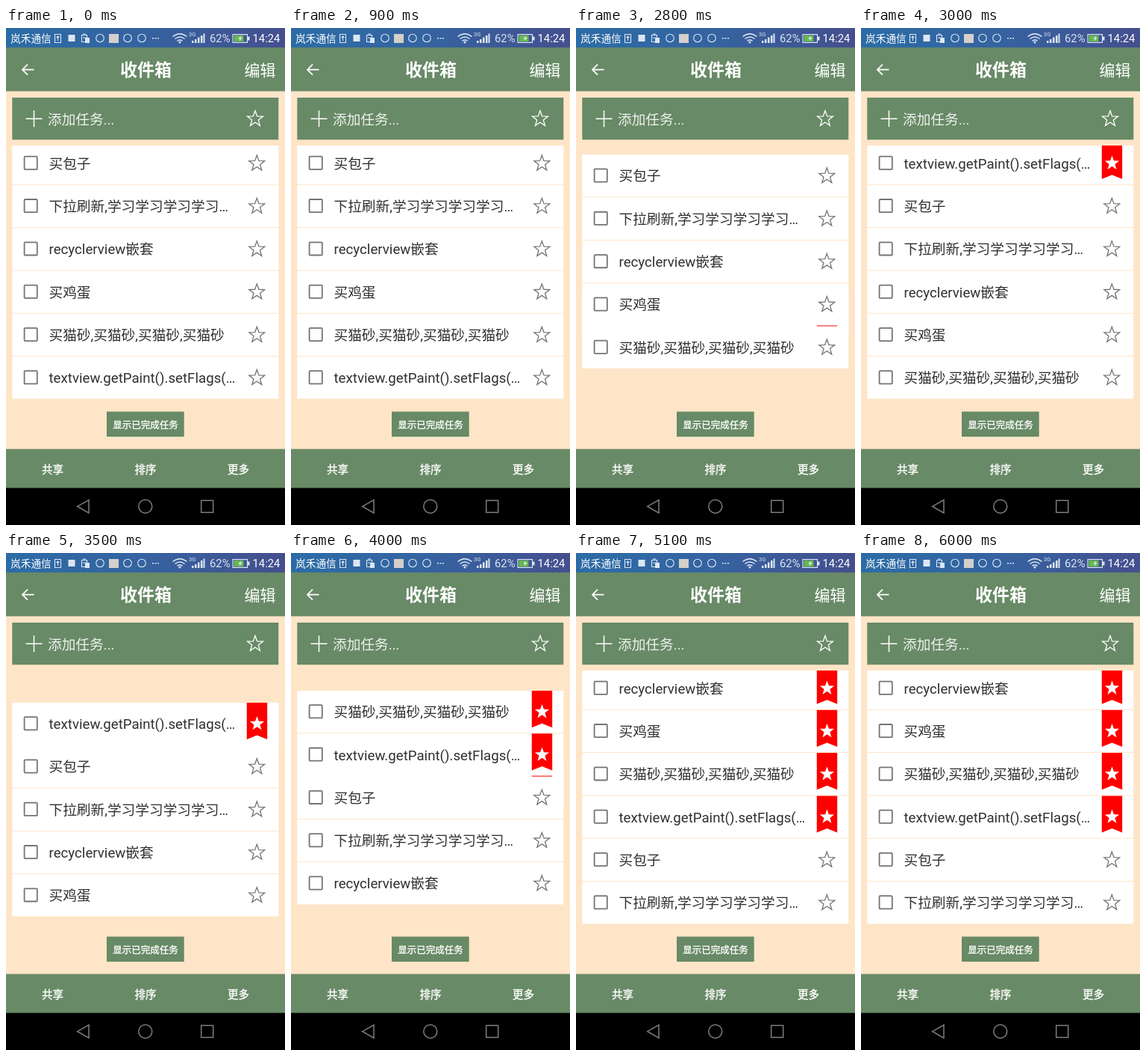
Recreate the animation shown at these times as an HTML page. Size 374 by 664 pixels, loop 6.4 s.

```html
<!DOCTYPE html>
<html lang="zh-CN">
<head>
<meta charset="utf-8">
<title>收件箱</title>
<style>
html, body { margin: 0; width: 100%; height: 100%; overflow: hidden; background: #000; }
svg { display: block; font-family: Roboto, "Noto Sans CJK SC", "Noto Sans CJK", sans-serif; }
.line { fill: none; stroke: #fff; stroke-width: 1.8; }
.thin { stroke-width: 1.3; }
.pale { stroke: #dce6f2; stroke-width: 1.1; }
.mid { text-anchor: middle; }
.medium { text-anchor: middle; stroke: #fff; stroke-width: .35; }
.row text { font-size: 18.7px; fill: #303030; }
.row .line { stroke: #747474; }
</style>
</head>
<body>
<svg width="374" height="664" viewBox="0 0 374 664" fill="#fff">
  <defs>
    <path id="star"/>
    <clipPath id="view"><rect x="8" y="157" width="358" height="339"/></clipPath>
    <linearGradient id="sky">
      <stop stop-color="#2c6ca6"/>
      <stop offset=".5" stop-color="#3563a0"/>
      <stop offset="1" stop-color="#454f8e"/>
    </linearGradient>
  </defs>
  <rect width="374" height="664" fill="#ffe5c8"/>

  <!-- status bar -->
  <rect width="374" height="26" fill="url(#sky)"/>
  <g fill="#dce6f2">
    <text x="6" y="19" font-size="13.7" fill="#fff">岚禾通信</text>
    <path class="line pale" d="M65.500 8.500h8v11h-8zM69.500 17v-6m-2 2l2-2l2 2M101.500 9.500h7v9h-7zM103 8h4M103 13h4"/>
    <rect x="83.500" y="9" width="9" height="9"/>
    <path d="M106 13h6v7h-6z"/>
    <rect x="138" y="8" width="13" height="12" fill="#d5cfca"/>
    <g class="line pale">
      <circle cx="126" cy="13.500" r="5.300"/>
      <circle cx="163" cy="13.500" r="5.300"/>
      <circle cx="182" cy="13.500" r="5.300"/>
    </g>
    <path d="M196 13h2v1.500h-2zM199.500 13h2v1.500h-2zM203 13h2v1.500h-2z"/>
    <path class="line pale" style="stroke-width:1.500" d="M223.500 11.500q9.500-7.500 19 0M226.500 14.500q6.500-5 13 0M229.500 17.300q3.500-2.500 7 0"/>
    <circle cx="233" cy="19" r="1.500"/>
    <text x="245" y="11" font-size="7.500">3G</text>
    <path d="M249 17h2.500v3H249zM253 15h2.500v5H253zM257 12.500h2.500V20H257zM261 10h2.500v10H261zM264.500 7.500h2V20h-2z"/>
    <text x="273" y="19" font-size="14.800">62%</text>
    <path class="line pale" d="M304 8.600h19.500v10.800H304z"/>
    <path d="M324 11.500h2.500v5H324z"/>
    <path fill="#65b94b" d="M305.500 10h13v8h-13z"/>
    <path d="M315 10.500l-4 4h2.500l-1 3l4.500-4.500h-2.500z"/>
    <text x="330.500" y="19" font-size="14.800" fill="#fff">14:24</text>
  </g>

  <!-- header, entry box, footer -->
  <path fill="#688a66" d="M0 26h374v58.500H0zM8.300 93h357v56.300h-357zM135 512.500h103.700v33.500H135zM0 562.500h374V615H0z"/>
  <path class="line" d="M37.500 55.700H22M29 48.700l-7 7l7 7"/>
  <text class="mid" x="187.500" y="64" font-size="23" font-weight="700">收件箱</text>
  <text x="319.500" y="64" font-size="21">编辑</text>
  <path class="line" style="stroke-width:1.500" d="M26.500 121.300h22M37.500 110.300v22"/>
  <text x="56" y="128.500" font-size="18.700" fill="#eef2ee">添加任务...</text>
  <use class="line thin" href="#star" transform="translate(334 121.500)"/>
  <g id="list" clip-path="url(#view)"></g>
  <g class="medium">
    <text x="187" y="534.500" font-size="12.500">显示已完成任务</text>
    <g font-size="14.500">
      <text x="62.500" y="594.500">共享</text>
      <text x="187" y="594.500">排序</text>
      <text x="311.500" y="594.500">更多</text>
    </g>
  </g>

  <!-- navigation bar -->
  <rect y="614.500" width="374" height="50" fill="#000"/>
  <g class="line" style="stroke:#7c7c7c;stroke-width:1.500">
    <path d="M111 630.500v17.500L95.700 639.200zM261.700 631.200h16v16h-16z"/>
    <circle cx="186.800" cy="639.200" r="9"/>
  </g>
</svg>
<script>
const LOOP = 6400, STEP = 100, PITCH = 57.3, FIRST = 180.7;
const MOVE = 220, STARTS = [2720, 3340, 3883, 4382];
const TASKS = ['买包子', '下拉刷新,学习学习学习学习…', 'recyclerview嵌套', '买鸡蛋',
  '买猫砂,买猫砂,买猫砂,买猫砂', 'textview.getPaint().setFlags(…'];
const COUNT = TASKS.length;
const list = document.getElementById('list');

const corners = Array.from({ length: 10 }, (_, i) => {
  const r = i % 2 ? 4.5 : 11, a = i * Math.PI / 5;
  return `${r * Math.sin(a)} ${-r * Math.cos(a)}`;
});
document.getElementById('star').setAttribute('d', `M${corners.join('L')}z`);

list.innerHTML = TASKS.map(task => `<g class="row">
  <rect x="8.3" y="-28.2" width="357" height="56.3"/>
  <rect class="line" x="24.6" y="-9" width="17.2" height="17.2" rx="1"/>
  <text x="57.5" y="7">${task}</text>
  <use class="line thin" href="#star" transform="translate(336.3 0.3)"/>
  <g class="flag"><path fill="#f00" d="M322.800 -28.200h27.400v49.200l-13.700-5.500l-13.700 5.500z"/>
  <use href="#star" transform="translate(336.5 0) scale(.92)"/></g></g>`).join('');
const rows = [...list.children];
const flags = rows.map(row => row.querySelector('.flag'));

function ease(x) {
  return (1 - Math.cos(Math.PI * Math.min(1, Math.max(0, x)))) / 2;
}

// Each move sends the last task to the top, sliding behind the others.
function draw(time) {
  const total = STARTS.reduce((sum, start) => sum + ease((time - start) / MOVE), 0);
  const done = Math.floor(total), part = total - done, begun = Math.ceil(total);
  rows.forEach((row, i) => {
    const from = (i + done) % COUNT, to = (from + 1) % COUNT;
    const y = FIRST + PITCH * (from + (to - from) * part);
    row.setAttribute('transform', `translate(0 ${y})`);
    flags[i].setAttribute('visibility', i >= COUNT - begun ? 'visible' : 'hidden');
  });
  const mover = rows[COUNT - 1 - done];
  if (part && list.firstChild !== mover) list.prepend(mover);
}

function tick() {
  // The screen refreshes in steps of a tenth of a second.
  draw(Math.floor(performance.now() % LOOP / STEP) * STEP);
  requestAnimationFrame(tick);
}
tick();
</script>
</body>
</html>
```
